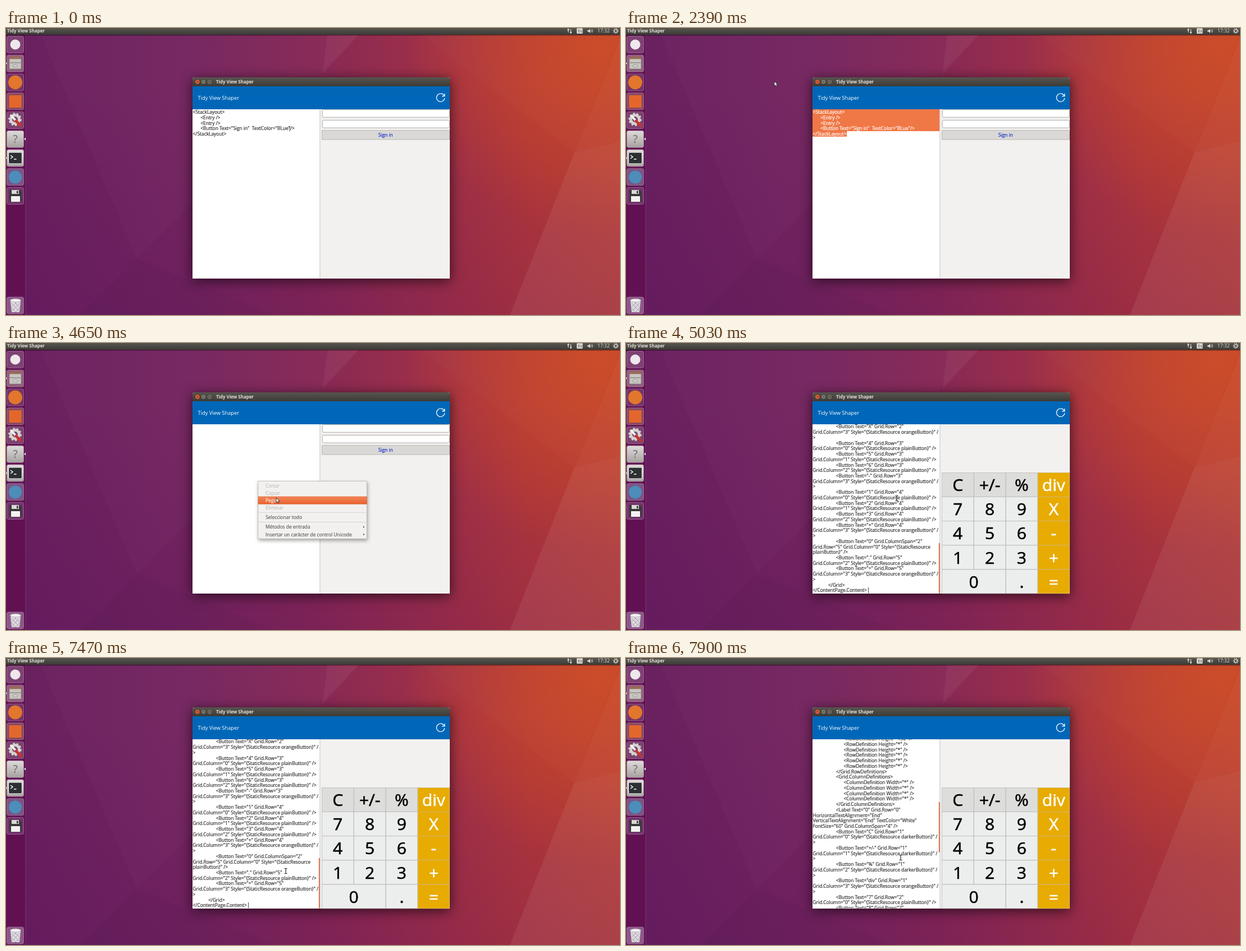
An HTML page for the animation above (8000 ms loop, 1093 px wide and 512 px high).

```html
<!DOCTYPE html>
<html lang="en">
<head>
<meta charset="utf-8">
<title>Tidy View Shaper</title>
<style>
  html, body { margin: 0; width: 100%; height: 100%; overflow: hidden; background: #75265f; }
  svg { display: block; font: 8.41px "Open Sans", "Noto Sans", sans-serif; }
  #win { filter: drop-shadow(0 4px 11px rgba(0,0,0,.65)); }
  #menu { filter: drop-shadow(1px 3px 3px rgba(0,0,0,.35)); }
  #plain, #code { fill: #333; stroke: #333; stroke-width: .22; }
  #inverse { fill: #fff; stroke: #fff; stroke-width: .22; }
  #items { stroke: #4c4c4c; stroke-width: .1; }
  .bold { font-weight: 700; font-size: 7.9px; fill: #e4e0d8; }
  .key { font-size: 30px; text-anchor: middle; stroke-width: .6; }
</style>
</head>
<body>
<svg width="1093" height="512" viewBox="0 0 1093 512">
  <defs>
    <linearGradient id="sky">
      <stop offset="0" stop-color="#68205f"/><stop offset=".3" stop-color="#75265f"/>
      <stop offset=".5" stop-color="#862856"/><stop offset=".67" stop-color="#9c2f4a"/>
      <stop offset=".85" stop-color="#b2383a"/><stop offset="1" stop-color="#b93e33"/>
    </linearGradient>
    <linearGradient id="dusk" x2="0" y2="1">
      <stop offset=".2" stop-color="#50085a" stop-opacity="0"/><stop offset="1" stop-color="#50085a" stop-opacity=".2"/>
    </linearGradient>
    <radialGradient id="sun" gradientUnits="userSpaceOnUse" cx="1050" cy="30" r="340">
      <stop offset="0" stop-color="#d4501f" stop-opacity=".65"/><stop offset="1" stop-color="#d4501f" stop-opacity="0"/>
    </radialGradient>
    <linearGradient id="bar" x2="0" y2="1"><stop offset="0" stop-color="#57554f"/><stop offset="1" stop-color="#3c3b37"/></linearGradient>
    <linearGradient id="hot" x2="0" y2="1"><stop offset="0" stop-color="#f58558"/><stop offset="1" stop-color="#e8622f"/></linearGradient>
    <linearGradient id="grey" x2="0" y2="1"><stop offset="0" stop-color="#dedcda"/><stop offset="1" stop-color="#a6a29f"/></linearGradient>
    <clipPath id="pane"><path d="M332 145H558.5V446.5H332z"/></clipPath>
    <clipPath id="selClip"><path id="selClipPath"/></clipPath>
  </defs>

  <!-- wallpaper -->
  <rect width="1093" height="512" fill="url(#sky)"/>
  <rect width="1093" height="512" fill="url(#dusk)"/>
  <rect width="1093" height="512" fill="url(#sun)"/>
  <g fill="#fff">
    <path d="M62 12H628L233 412z" opacity=".015"/>
    <path d="M572 12H628L563 83z" opacity=".045"/>
    <path d="M738 12H1093L1012 222z" opacity=".015"/>
    <path d="M1012 222L1093 202V512H897z" opacity=".065"/>
    <path d="M1012 222L1093 20V202z" opacity=".04"/>
  </g>
  <path d="M132 512L233 412L480 512z" opacity=".035"/>

  <!-- launcher -->
  <rect y="12" width="35" height="500" fill="#611152"/>
  <path d="M35 12V512" stroke="#85406f" stroke-width=".8"/>
  <g id="tiles"></g>
  <circle cx="16.500" cy="29.500" r="9" fill="#eee8ec"/>
  <path d="M6 55H27V73H6z" fill="#c9c5c0" stroke="#77716c" stroke-width=".6"/>
  <path d="M6 55L8 51H25L27 55z" fill="#9c6a52"/>
  <path d="M7 62H26" stroke="#77716c"/>
  <rect x="12.500" y="66" width="8" height="3" rx="1" fill="#eee" stroke="#666" stroke-width=".7"/>
  <circle cx="16.500" cy="97" r="12.500" fill="#e2762c"/>
  <rect x="5.500" y="120" width="22" height="22" fill="#e3672c"/>
  <circle cx="16" cy="163" r="7.500" fill="none" stroke="#d5d2cf" stroke-width="5"/>
  <circle cx="16" cy="163" r="10.500" fill="none" stroke="#d5d2cf" stroke-width="2.500" stroke-dasharray="3.500 3"/>
  <path d="M9 156L19 167" stroke="#f4f3f1" stroke-width="4"/>
  <path d="M18 166L26 174" stroke="#c8342f" stroke-width="5" stroke-linecap="round"/>
  <text x="16.500" y="205" font-size="20" text-anchor="middle" fill="#6d6871">?</text>
  <rect x="4.500" y="222" width="24" height="20" rx="1.500" fill="#2c3033" stroke="#f2f2f2" stroke-width="1.200"/>
  <path d="M8 227L12 230L8 233M14 234H18.500" fill="none" stroke="#fff" stroke-width="1.500"/>
  <circle cx="16.500" cy="266" r="11.500" fill="#4c8db9"/>
  <path d="M6 289H25L28 292V310H6z" fill="#38383a"/>
  <path d="M10 289H23V296H10z" fill="#dad8d5"/><path d="M19 290.500H21.500V295H19z" fill="#38383a"/>
  <path d="M9 300H25V310H9z" fill="#f3f2f0"/>
  <path d="M8 487H26L24 507H10z" fill="#dedce0"/>
  <path d="M10 491L24 506M16 490L24 498M10 499L17 507M24 491L10 506M18 490L10 498M24 499L17 507" stroke="#a296a5" stroke-width=".9"/>
  <ellipse cx="17" cy="486" rx="9.500" ry="3" fill="#f3f1f4" stroke="#aaa0ad" stroke-width=".8"/>
  <path d="M35 195.500V200.500L32 198z" fill="#eee"/>
  <path d="M0 61L2 63L0 65zM0 230L2 232L0 234z" fill="#ddd"/>

  <!-- top panel -->
  <rect y="12" width="1093" height="1.500" opacity=".4"/>
  <rect width="1093" height="12" fill="url(#bar)"/>
  <text class="bold" x="2" y="7.5">Tidy View Shaper</text>
  <g fill="#dfdbd2" stroke="#dfdbd2">
    <path d="M1001 8V2M999.5 4L1001 1.5L1002.5 4M1005.500 2V8.500M1004 7L1005.500 9.500L1007 7" fill="none" stroke-width="1.2"/>
    <rect x="1016" y="0.500" width="10.500" height="9.500" rx="1" stroke="none"/>
    <path d="M1035 4H1037L1040 1.500V9L1037 6.500H1035z" stroke="none"/>
    <path d="M1041.500 3.500Q1043 5 1041.500 7M1043 2Q1046 5 1043 8.500" fill="none" stroke-width=".9"/>
    <circle cx="1085.500" cy="5.200" r="2.600" fill="none" stroke-width="1.300"/>
    <circle cx="1085.500" cy="5.200" r="4.200" fill="none" stroke-width="1.400" stroke-dasharray="1.500 1.800"/>
  </g>
  <text x="1018" y="8" font-size="7.500" fill="#444">Es</text>
  <text x="1053" y="8" fill="#dfdbd2">17:32</text>

  <!-- window -->
  <g id="win">
    <path d="M332 447V92Q332 88 336 88H786Q790 88 790 92V447z" fill="#f2f1f0"/>
    <path d="M332 104V92Q332 88 336 88H786Q790 88 790 92V104z" fill="url(#bar)"/>
  </g>
  <g stroke="#33322e" stroke-width=".7">
    <circle cx="340.800" cy="96" r="4.300" fill="#e65e34"/>
    <circle cx="351.600" cy="96" r="4.300" fill="#7a786f"/>
    <circle cx="362.400" cy="96" r="4.300" fill="#7a786f"/>
  </g>
  <path d="M339.300 94.500L342.300 97.500M342.300 94.500L339.300 97.500M349.800 96H353.400M360.900 94.500H363.900V97.500H360.900z" fill="none" stroke="#3d302a" stroke-width=".8"/>
  <text class="bold" x="374" y="99">Tidy View Shaper</text>
  <rect x="332" y="104" width="458" height="41" fill="#0067b8"/>
  <text x="341.500" y="127.700" font-size="9.300" fill="#fff">Tidy View Shaper</text>
  <path d="M780.300 121.500A7.200 7.200 0 1 0 780.800 125M780.800 117V121.700H776" fill="none" stroke="#fff" stroke-width="1.200"/>

  <!-- editor -->
  <rect x="332" y="145" width="226.500" height="302" fill="#fff"/>
  <path d="M558.900 145V447" stroke="#c9c7c5"/>
  <g clip-path="url(#pane)">
    <g id="form"><g id="plain"></g>
      <path id="sel" fill="#f07746"/>
      <g id="inverse" clip-path="url(#selClip)"></g>
    </g>
    <g id="code"></g>
    <path id="caret" stroke="#333" stroke-width=".9"/>
  </g>
  <rect id="thumb" x="556.800" width="2" height="89.500" fill="#d9724a"/>

  <!-- preview panes -->
  <g id="signIn">
    <g fill="#fff" stroke="#b0aca8">
      <rect x="563.200" y="145.700" width="226" height="13.600" rx="2"/>
      <rect x="563.200" y="164.500" width="226" height="13.600" rx="2"/>
    </g>
    <rect x="562.500" y="182.700" width="227" height="16.300" fill="#dad8d6" stroke="#bab7b4"/>
    <text x="675.700" y="193.800" text-anchor="middle" fill="#1029c8" stroke="#1029c8" stroke-width=".2">Sign in</text>
  </g>
  <g id="calc"></g>

  <!-- context menu -->
  <g id="menu">
    <rect x="448.800" y="246.500" width="193.500" height="102.700" fill="#f2f1f0" stroke="#b9b5b0" stroke-width=".8"/>
    <rect id="hover" x="449" y="274" width="193.500" height="13.300" fill="url(#hot)" stroke="#d9602f" stroke-width=".6"/>
    <path d="M449.500 302.300H642M449.500 319.500H642" stroke="#d8d5d2"/>
    <path d="M636 326.200V330L638.300 328.100zM636 339.500V343.300L638.300 341.400z" fill="#4c4c4c"/>
    <g id="items"></g>
  </g>

  <path id="arrow" d="M0 0V8.500L2 6.800L3.300 10L4.800 9.300L3.500 6.300H6z" fill="#fff" stroke="#111" stroke-width=".8"/>
  <path id="beam" d="M-2.500 -4.500H-.8L0 -4L.8 -4.500H2.500M0 -4V4M-2.500 4.500H-.8L0 4L.8 4.500H2.500" fill="none" stroke="#222" stroke-width="1.200"/>
</svg>
<script>
const $ = id => document.getElementById(id);
const LOOP = 8000, PITCH = 9.733, LEFT = 332.5, INDENT = 13.75, NOTCH = 37.28;
const esc = s => s.replace(/&/g, '&amp;').replace(/</g, '&lt;');
const text = (x, y, s, attrs = '') => `<text x="${x}" y="${y}" ${attrs}>${esc(s)}</text>`;
const layLines = (lines, y) => lines.map(([depth, s], i) =>
  text(LEFT + depth * INDENT, y + i * PITCH, s)).join('');

// launcher tiles
const tileFills = ['#7f4275', '#91607f', '#743468', '#8b4a62', '#7c426f', 'url(#grey)', 'url(#grey)', '#7b5585', '#72346c'];
$('tiles').innerHTML = [...tileFills, '#8c5888'].map((fill, i) =>
  `<rect x="1.5" y="${i < 9 ? 14.5 + i * 33.75 : 480}" width="30" height="30" rx="3" fill="${fill}" stroke="#b18bab" stroke-opacity=".6"/>`).join('');

// first document
const formLines = [
  [0, '<StackLayout>'], [1, '<Entry />'], [1, '<Entry />'],
  [1, '<Button Text="Sign in"\u00a0 TextColor="BLue"/>'], [0, '</StackLayout>']
];
$('plain').innerHTML = $('inverse').innerHTML = layLines(formLines, 153.2);

// keypad: [label, row, column, style]
const rows = ['C +/- % div', '7 8 9 X', '4 5 6 -', '1 2 3 +', '0 . ='].map(r => r.split(' '));
const keys = rows.flatMap((row, r) => row.map((label, i) => {
  const col = r === 4 && i ? i + 1 : i;
  return [label, r + 1, col, col === 3 ? 'orange' : r ? 'plain' : 'darker'];
}));

function keyMarkup([label, row, col, style]) {
  if (label === '0') return [
    [3, '<Button Text="0" Grid.ColumnSpan="2"'],
    [0, 'Grid.Row="5" Grid.Column="0" Style="{StaticResource'],
    [0, 'plainButton}" />']
  ];
  const head = [3, `<Button Text="${label}" Grid.Row="${row}"`];
  const tail = `Grid.Column="${col}" Style="{StaticResource ${style}Button}" /`;
  return style === 'plain' ? [head, [0, tail + '>']] : [head, [0, tail], [0, '>']];
}

const codeLines = [
  [4, '<RowDefinition Height="150" />'],
  ...Array(5).fill([4, '<RowDefinition Height="*" />']),
  [3, '</Grid.RowDefinitions>'],
  [3, '<Grid.ColumnDefinitions>'],
  ...Array(4).fill([4, '<ColumnDefinition Width="*" />']),
  [3, '</Grid.ColumnDefinitions>'],
  [3, '<Label Text="0" Grid.Row="0"'],
  [0, 'HorizontalTextAlignment="End"'],
  [0, 'VerticalTextAlignment="End" TextColor="White"'],
  [0, 'FontSize="60" Grid.ColumnSpan="4" />'],
  ...keys.flatMap(keyMarkup),
  [2, '</Grid>'], [0, '</ContentPage.Content>']
];
$('code').innerHTML = layLines(codeLines, 444.4 - (codeLines.length - 1) * PITCH);

const keyFill = { plain: '#eceeed', darker: '#dddddb', orange: '#e8ab02' };
$('calc').innerHTML = keys.map(([label, row, col, style]) => {
  const x = 562.5 + col * 56.9, y = 188.3 + row * 43.15, w = label === '0' ? 113.8 : 56.9;
  const ink = style === 'orange' ? '#fff' : '#000';
  return `<rect x="${x}" y="${y}" width="${w - .5}" height="42.8" fill="${keyFill[style]}" stroke="${style === 'orange' ? '#cfb468' : '#bcbcba'}" stroke-width=".8"/>` +
    text(x + w / 2 - .3, y + 32.7, label, `class="key" fill="${ink}" stroke="${ink}"`);
}).join('');

const items = [
  ['Cortar', 257.5, 1], ['Copiar', 270.8, 1], ['Pegar', 284], ['Eliminar', 297.2, 1],
  ['Seleccionar todo', 314.2], ['Métodos de entrada', 331.2], ['Insertar un carácter de control Unicode', 344.5]
];
$('items').innerHTML = items.map(([s, y, off]) =>
  text(462, y, s, off ? 'fill="#b5b2af" stroke="none"' : 'fill="#4c4c4c"')).join('');
const paste = $('items').children[2];

// how many of n steps, spread from a to b, have happened at t
const stepsDone = (t, a, b, n) =>
  t < a ? 0 : Math.min(n, 1 + Math.floor((t - a) * (n - 1) / (b - a || 1)));

// pointer path: [start, end, steps, x, y]
const moves = [
  [440, 820, 6, 459, 333], [1220, 2010, 11, 312, 109], [2100, 2390, 5, 264, 95],
  [3310, 3310, 1, 246, 112], [3390, 3550, 3, 408, 174], [3630, 3700, 2, 451, 247],
  [3860, 3860, 1, 449, 246], [4240, 4650, 6, 481, 276], [4790, 4790, 1, 482, 277],
  [6350, 6810, 7, 474, 340], [6970, 7470, 7, 498, 380], [7530, 7900, 6, 489, 356]
];
function pointerAt(t) {
  let x = 907, y = 523;
  for (const [a, b, n, toX, toY] of moves) {
    const k = stepsDone(t, a, b, n) / n;
    x += (toX - x) * k;
    y += (toY - y) * k;
  }
  return [x, y];
}

// selection from the pointer to the end of the text
function selectionPath(t, x, y) {
  if (t < 1220 || t >= 2950 || y > 194) return '';
  const first = t >= 2010 ? 0 : Math.max(0, Math.floor((y - 145) / PITCH));
  let d = '';
  for (let i = first; i < 5; i++) {
    const end = i === 4 ? 393 : 558;
    const start = i === first && t < 2010 ? Math.min(end, Math.max(332, x)) : 332;
    d += `M${start} ${145 + i * PITCH}H${end}v${PITCH + .1}H${start}z`;
  }
  return d;
}

const show = (id, on) => $(id).style.display = on ? '' : 'none';

function caretPath(t, scroll) {
  if (t < 1220) return 'M505 175V184.500';
  if (t >= 2950 && t < 3860) return 'M332.900 146V155';
  const blinkOn = (t - 5560 + 1170) % 1170 < 790;
  return t >= 4910 && blinkOn ? `M431.500 ${436 + scroll}v10` : '';
}

function draw(t) {
  const [x, y] = pointerAt(t);
  const scroll = Math.round(1.5 * stepsDone(t, 7530, 7900, 6)) * NOTCH;
  const menuOpen = t >= 3860 && t < 4910;
  const pasted = t >= 4910, built = t >= 5030;

  const sel = selectionPath(t, x, y);
  $('sel').setAttribute('d', sel);
  $('selClipPath').setAttribute('d', sel);
  show('form', t < 2950);
  show('code', pasted);
  $('code').setAttribute('transform', `translate(0 ${scroll})`);
  show('thumb', pasted);
  $('thumb').setAttribute('y', 357 - scroll * .298);
  $('caret').setAttribute('d', caretPath(t, scroll));
  show('signIn', !built);
  show('calc', built);

  show('menu', menuOpen);
  $('menu').style.opacity = t < 4790 ? stepsDone(t, 3860, 4030, 3) / 3 : .5;
  const hover = y >= 274;
  show('hover', hover);
  paste.setAttribute('fill', hover ? '#fff' : '#4c4c4c');
  paste.setAttribute('stroke', hover ? '#fff' : '#4c4c4c');

  const dragging = t >= 1220 && t < 2100;
  const overText = x > 332 && x < 558 && y > 145 && y < 447 && !(t >= 3860 && t < 4790);
  const beam = dragging || overText;
  show('beam', t >= 440 && beam);
  show('arrow', t >= 440 && !beam);
  $(beam ? 'beam' : 'arrow').setAttribute('transform', `translate(${x} ${y})`);
}

const began = performance.now();
function tick() {
  draw((performance.now() - began) % LOOP);
  requestAnimationFrame(tick);
}
tick();
</script>
</body>
</html>
```
